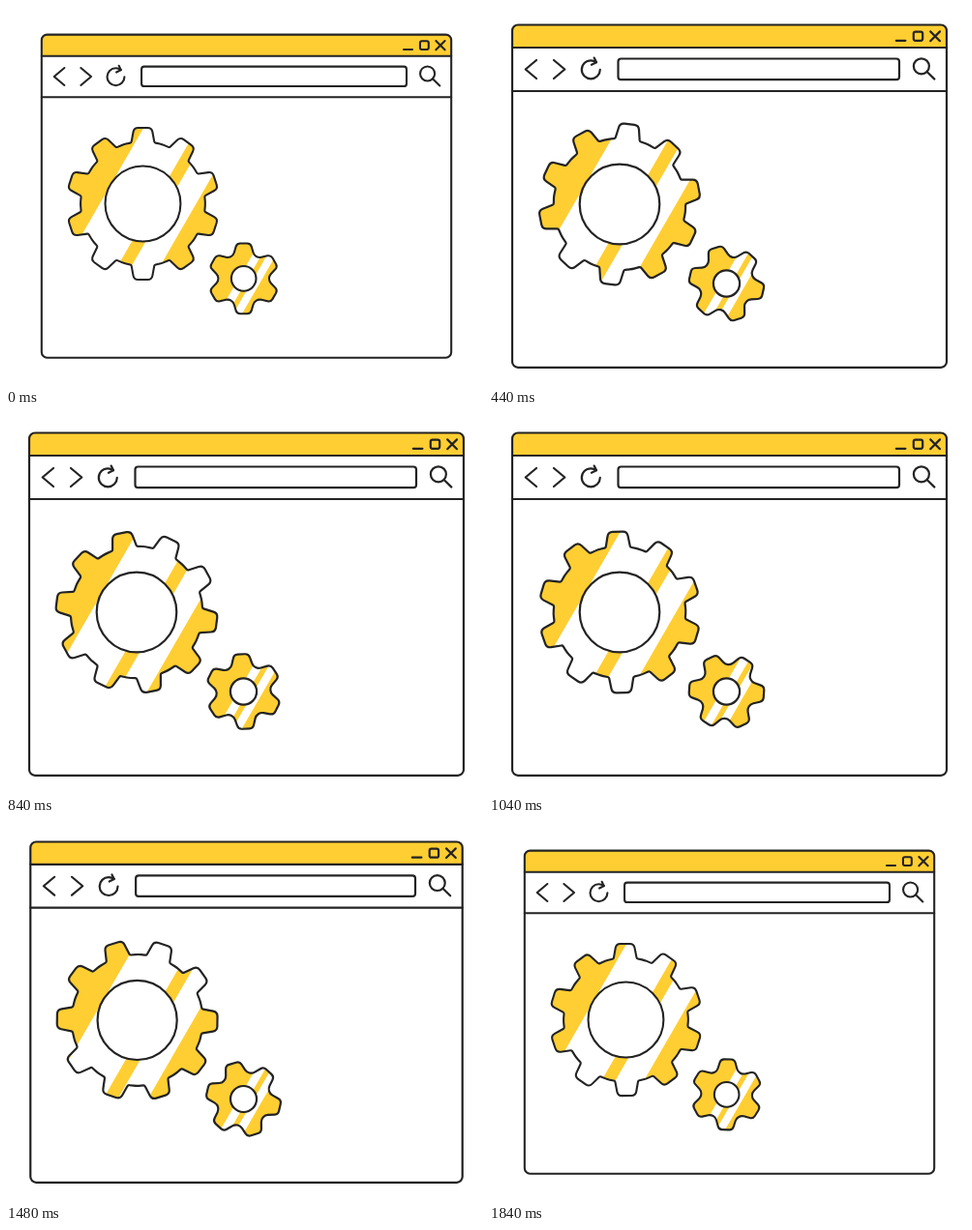
Animation, 493 px wide and 393 px high, one loop 1880 ms. Source, as an HTML page with a canvas:

```html
<!DOCTYPE html>
<html lang="en">
<head>
<meta charset="utf-8">
<title>Browser window with gears</title>
<style>
  html, body { margin: 0; width: 100%; height: 100%; overflow: hidden; background: #fff; }
  canvas { display: block; }
</style>
</head>
<body>
<canvas id="stage" width="493" height="393"></canvas>
<script>
const ctx = document.getElementById('stage').getContext('2d');
const LOOP = 1880, STEP = 40;
const YELLOW = '#ffce32', INK = '#232323';
const CX = 248.5, CY = 196.7, TAU = Math.PI * 2;
const SLANT = Math.tan(Math.PI / 6);

// corners: [x, y, radius] on the right half of the upright tooth
// stripes: [from, to] distances along the x axis through the hub
const gears = [
  { x: 135, y: 205, teeth: 10, hole: 41.3, turn: 72,
    corners: [[9.7, -83.3, 5.5], [12.7, -67, 2], [21.1, -65.1, 30]],
    stripes: [[-200, -47.3], [11.8, 27], [58.3, 200]] },
  { x: 245.5, y: 287, teeth: 6, hole: 13.6, turn: -180,
    corners: [[7.5, -38.6, 5], [12.5, -21.65, 7.5]],
    stripes: [[-100, -5.5], [4.5, 10.8], [20.5, 100]] }
];

// Speeds up, runs steadily, then stops softly
function spin(t) {
  const v = 1 / 1562;
  if (t < 110) return 0;
  if (t < 470) return v * (t - 110) ** 2 / 720;
  if (t < 1824) return v * (t - 290);
  return 1 - v * (LOOP - t) ** 2 / 112;
}

// Shrinks a little, grows to full size, and mirrors that on the way back
function zoom(t) {
  const rest = 0.943, low = 0.9165;
  const ease = (a, b) => {
    const k = Math.min(1, Math.max(0, (m - a) / (b - a)));
    return (1 - Math.cos(Math.PI * k)) / 2;
  };
  const m = Math.min(t, LOOP - t);
  return m < 200 ? rest + (low - rest) * ease(80, 200)
                 : low + (1 - low) * ease(200, 440);
}

function line(...pts) {
  ctx.beginPath();
  for (let i = 0; i < pts.length; i += 2) ctx.lineTo(pts[i], pts[i + 1]);
  ctx.stroke();
}

function box(x, y, w, h, r) {
  ctx.beginPath();
  ctx.roundRect(x, y, w, h, r);
}

function arc(x, y, r, from = 0, to = TAU) {
  ctx.beginPath();
  ctx.arc(x, y, r, from, to);
}

function gearPath(g, angle) {
  const left = g.corners.slice(0, -1).reverse().map(([x, y, r]) => [-x, y, r]);
  const tooth = [...left, ...g.corners];
  const pts = [];
  for (let i = 0; i < g.teeth; i++) {
    const a = angle + i * TAU / g.teeth, c = Math.cos(a), s = Math.sin(a);
    for (const [x, y, r] of tooth) pts.push([x * c - y * s, x * s + y * c, r]);
  }
  const path = new Path2D(), n = pts.length, last = pts[n - 1];
  path.moveTo((last[0] + pts[0][0]) / 2, (last[1] + pts[0][1]) / 2);
  pts.forEach(([x, y, r], i) => {
    const next = pts[(i + 1) % n];
    path.arcTo(x, y, next[0], next[1], r);
  });
  path.closePath();
  return path;
}

function drawGear(g, p) {
  const path = gearPath(g, g.turn * p * Math.PI / 180);
  ctx.save();
  ctx.translate(g.x, g.y);
  ctx.save();
  ctx.clip(path);
  ctx.fillStyle = YELLOW;
  const h = 100, d = h * SLANT;
  for (const [a, b] of g.stripes) {
    ctx.beginPath();
    ctx.moveTo(a + d, -h);
    ctx.lineTo(b + d, -h);
    ctx.lineTo(b - d, h);
    ctx.lineTo(a - d, h);
    ctx.fill();
  }
  ctx.restore();
  ctx.stroke(path);
  arc(0, 0, g.hole);
  ctx.fillStyle = '#fff';
  ctx.fill();
  ctx.stroke();
  ctx.restore();
}

function drawWindow() {
  ctx.save();
  box(24, 19.5, 449, 354.3, 6);
  ctx.clip();
  ctx.fillStyle = YELLOW;
  ctx.fillRect(24, 19.5, 449, 23.5);
  ctx.restore();
  box(24, 19.5, 449, 354.3, 6);
  ctx.stroke();
  line(24, 43, 473, 43);
  line(24, 88, 473, 88);

  // Window buttons
  line(420.8, 35.8, 430.4, 35.8);
  box(438.8, 26.6, 9.4, 9.2, 2);
  ctx.stroke();
  line(456.2, 26.4, 466, 36.2);
  line(466, 26.4, 456.2, 36.2);

  // Back, forward, reload
  line(49, 56, 37.7, 65.5, 49, 75);
  line(67, 56, 78.3, 65.5, 67, 75);
  arc(105.3, 65.8, 9.5, 0, TAU - 0.93);
  ctx.stroke();
  line(108.7, 53.6, 111, 58.3, 106, 60.8);

  // Address bar and search
  box(133.5, 54.5, 290.5, 21.7, 3);
  ctx.stroke();
  arc(446.9, 62.3, 8);
  ctx.stroke();
  line(452.6, 68, 460.4, 75.6);
}

function draw(now) {
  const t = Math.floor(now % LOOP / STEP) * STEP;
  const s = zoom(t), p = spin(t);
  ctx.setTransform(1, 0, 0, 1, 0, 0);
  ctx.fillStyle = '#fff';
  ctx.fillRect(0, 0, 493, 393);
  ctx.translate(CX, CY);
  ctx.scale(s, s);
  ctx.translate(-CX, -CY);
  ctx.strokeStyle = INK;
  ctx.lineWidth = 2.2;
  ctx.lineCap = ctx.lineJoin = 'round';
  drawWindow();
  for (const g of gears) drawGear(g, p);
}

const start = performance.now();
function tick() {
  draw(performance.now() - start);
  requestAnimationFrame(tick);
}
tick();
</script>
</body>
</html>
```
